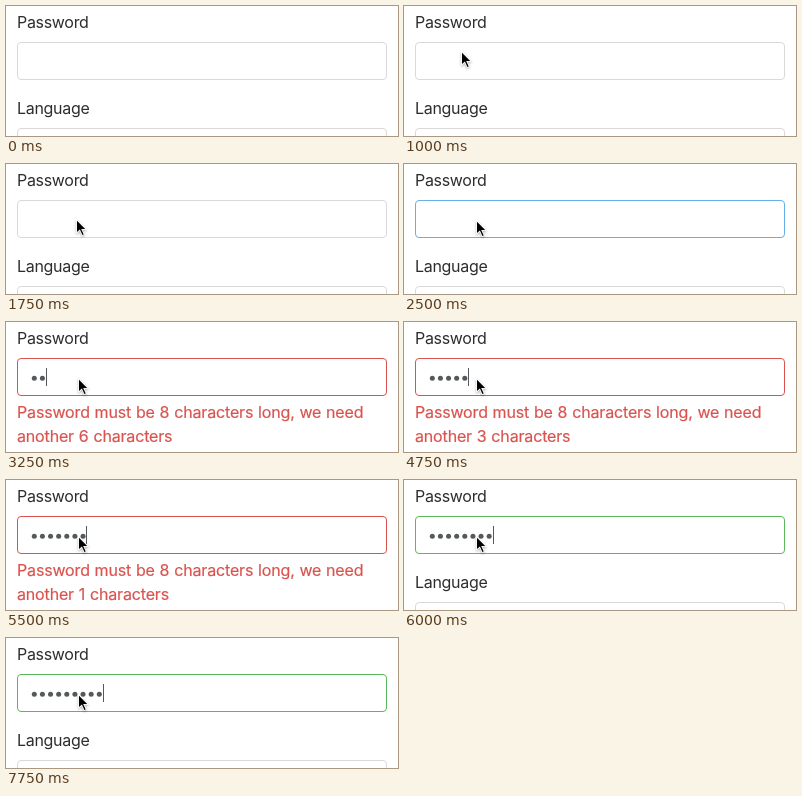
These frames come from a looping animation (392x130 px, 8000 ms). An HTML page with a canvas:

```html
<!DOCTYPE html>
<html lang="en">
<head>
<meta charset="utf-8">
<title>Password length check</title>
<style>
  html, body { margin: 0; width: 100%; height: 100%; overflow: hidden; background: #fff; }
  #stage { position: relative; width: 392px; height: 130px; overflow: hidden; background: #fff; }
  .text {
    position: absolute; left: 11px; white-space: pre;
    font: 16px/24px Inter, "Liberation Sans", sans-serif;
    letter-spacing: -0.31px; color: #2b2d2f;
  }
  .field {
    position: absolute; left: 11px; width: 370px; height: 38px;
    box-sizing: border-box; border: 1px solid #d9d9d9; border-radius: 4px;
  }
  #error {
    top: 78px; color: #d9534f; letter-spacing: -0.16px; word-spacing: 0.5px;
    -webkit-text-stroke: 0.2px #d9534f;
  }
  canvas { position: absolute; left: 0; top: 0; width: 392px; height: 130px; }
</style>
</head>
<body>
<div id="stage">
  <div class="text" style="top:4px">Password</div>
  <div class="field" id="password" style="top:36px"></div>
  <div id="language">
    <div class="text" style="top:90px">Language</div>
    <div class="field" style="top:122px"></div>
  </div>
  <div class="text" id="error"></div>
  <canvas id="ink"></canvas>
</div>
<script>
const LOOP = 8000, FOCUS = 2000, BLINK = 500;
const NEEDED = 8, TYPED = 9;
const LEFT = 24, ADVANCE = 8.125;
const INK = "#55595c";
// pointer tip: time, x, y
const path = [[750, 76, -6.5], [1000, 57, 44.5], [1250, 54, 54.5], [1750, 70, 54.5], [FOCUS, 72, 55.5]];

const $ = id => document.getElementById(id);
const canvas = $("ink"), ctx = canvas.getContext("2d");
const scale = window.devicePixelRatio || 1;
canvas.width = 392 * scale;
canvas.height = 130 * scale;

const arrow = new Path2D("M1 2.2V13.6L3.9 10.9L6.4 16.5L7.7 15.9L5.2 10.5H9.2Z");

// Six even keystrokes, then a quick one and a slowing finish.
function keyTime(i) {
  const late = i - 6;
  return late < 0 ? 2750 + 500 * i : 5500 + 125 * late * (late + 3);
}

function drawPointer(x, y) {
  ctx.save();
  ctx.translate(x, y);
  ctx.lineWidth = 1.6;
  ctx.strokeStyle = "#fff";
  ctx.shadowColor = "rgba(0,0,0,.35)";
  ctx.shadowBlur = 2.5 * scale;
  ctx.shadowOffsetY = scale;
  ctx.stroke(arrow);
  ctx.shadowColor = "transparent";
  ctx.fillStyle = "#000";
  ctx.fill(arrow);
  ctx.restore();
}

function drawDots(count) {
  ctx.fillStyle = INK;
  for (let i = 0; i < count; i++) {
    ctx.beginPath();
    ctx.arc(LEFT + 4.3 + ADVANCE * i, 56.3, 2.5, 0, Math.PI * 2);
    ctx.fill();
  }
}

function drawCaret(count, idle) {
  if (idle % (2 * BLINK) >= BLINK) return;
  ctx.fillStyle = INK;
  ctx.fillRect(Math.floor(LEFT + ADVANCE * count), 46, 1, 18);
}

function borderColor(t, count) {
  if (t < FOCUS) return "#d9d9d9";
  if (!count) return "#66afe9";
  return count < NEEDED ? "#d9534f" : "#5cb85c";
}

function render(t) {
  let count = 0;
  while (count < TYPED && keyTime(count) <= t) count++;
  const invalid = count > 0 && count < NEEDED;

  $("password").style.borderColor = borderColor(t, count);
  $("language").style.display = invalid ? "none" : "block";
  $("error").textContent = invalid
    ? `Password must be ${NEEDED} characters long, we need\nanother ${NEEDED - count} characters`
    : "";

  ctx.setTransform(scale, 0, 0, scale, 0, 0);
  ctx.clearRect(0, 0, 392, 130);
  drawDots(count);
  if (t >= FOCUS) drawCaret(count, t - (count ? keyTime(count - 1) : FOCUS));
  const spot = path.filter(([time]) => time <= t).pop();
  if (spot) drawPointer(spot[1], spot[2]);
}

const start = performance.now();
function tick() {
  render((performance.now() - start) % LOOP);
  requestAnimationFrame(tick);
}
tick();
</script>
</body>
</html>
```
